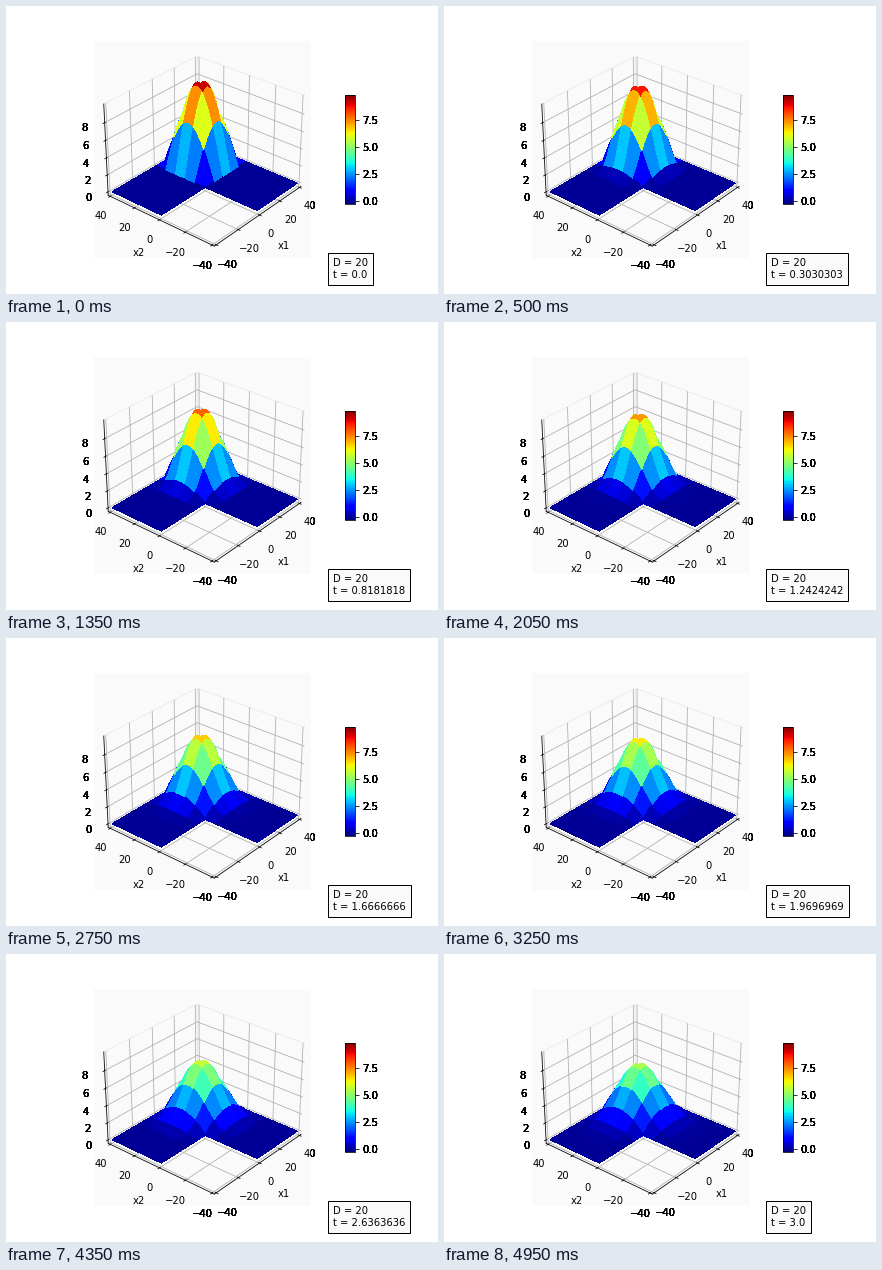
Animation, 432 px wide and 288 px high, one loop 5 s. Source, as a matplotlib script:

```python
import numpy as np
import matplotlib.pyplot as plt
from matplotlib.animation import FuncAnimation
from matplotlib.transforms import Bbox
from mpl_toolkits.mplot3d.art3d import Poly3DCollection

W, H = 432, 288
FRAMES, STEPS = 100, 3
LOW, HIGH = -0.2, 9.85
SIZE, STRIDE = 40, 8
DIFFUSION = 15
LEFT, BOTTOM, SIDE = 87.57, 36, 217.44

plt.rcParams["font.family"] = "DejaVu Sans"
fig = plt.figure(figsize=(W / 72, H / 72), dpi=72, facecolor="white")


def rect(x, y, w, h):
    return [x / W, y / H, w / W, h / H]


line = np.arange(-SIZE, SIZE + 1)
x, y = np.meshgrid(line, line)
inside = (abs(x) < SIZE) & (abs(y) < SIZE) & ~((x <= 0) & (y <= 0))


def solve():
    """Heat flow on the L, starting from one sine bump in a quarter."""
    bump = np.sin(np.pi * x / SIZE) * np.sin(np.pi * y / SIZE)
    u = np.where((x > 0) & (y > 0), HIGH * bump, 0) * inside
    rate = DIFFUSION / 33 / STEPS
    states = [u]
    for _ in range((FRAMES - 1) * STEPS):
        flow = sum(np.roll(u, d, axis) for d in (-1, 1) for axis in (0, 1))
        u = (u + rate * (flow - 4 * u)) * inside
        states.append(u)
    return states[::STEPS]


def cell_rims():
    """Row and column indices around the rim of every cell of the L."""
    run = np.arange(STRIDE)
    zero, full = 0 * run, 0 * run + STRIDE
    rows = np.concatenate([zero, run, full, STRIDE - run])
    cols = np.concatenate([run, full, STRIDE - run, zero])
    corners = [(j, i) for j in range(0, 2 * SIZE, STRIDE)
               for i in range(0, 2 * SIZE, STRIDE)
               if i >= SIZE or j >= SIZE]
    j, i = np.array(corners).T
    return j[:, None] + rows, i[:, None] + cols


states = solve()
rims = cell_rims()


def cells(u):
    return np.stack([x[rims], y[rims], u[rims]], axis=-1)


ax = fig.add_axes(rect(LEFT, BOTTOM, SIDE, SIDE), projection="3d",
                  facecolor="#fafafa")
ax.view_init(30, -140)
surf = Poly3DCollection(cells(states[0]), cmap="jet", linewidths=0,
                        antialiased=False)
surf.set_array(states[0][rims].mean(axis=1))
surf.set_clim(LOW, HIGH)
ax.add_collection3d(surf)

for axis in (ax.xaxis, ax.yaxis, ax.zaxis):
    axis.set_pane_color((0.98, 0.98, 0.98, 1))
    axis.pane.set_edgecolor("#ececec")
ax.set_xticks(range(-40, 41, 20))
ax.set_yticks(range(-40, 41, 20))
ax.set_zticks(range(0, 9, 2))


def padded(low, high):
    margin = (high - low) / 48
    return low - margin, high + margin


ax.set_xlim(padded(-SIZE, SIZE))
ax.set_ylim(padded(-SIZE, SIZE))
ax.set_zlim(padded(LOW, HIGH))
ax.set_xlabel("x1")
ax.set_ylabel("x2")

cax = fig.add_axes(rect(338.58, 90.36, SIDE / 20, SIDE / 2))
fig.colorbar(surf, cax=cax, ticks=[0, 2.5, 5, 7.5])

# Text is heavier wherever it leaves the plot square
strips = [Bbox.from_extents(0, 0, LEFT, H),
          Bbox.from_extents(LEFT + SIDE, 0, W, H),
          Bbox.from_extents(LEFT, 0, LEFT + SIDE, BOTTOM)]


def thicken(text):
    draw = text.draw

    def heavy(renderer):
        draw(renderer)
        text.set_clip_on(True)
        for strip in strips:
            text.set_clip_box(strip)
            for _ in range(8):
                draw(renderer)
        text.set_clip_box(None)

    text.draw = heavy


for axis in (ax.xaxis, ax.yaxis, ax.zaxis, cax.yaxis):
    for label in axis.get_ticklabels():
        thicken(label)

note = fig.text(327 / W, 14 / H, "", fontsize=10, va="bottom",
                bbox=dict(boxstyle="square,pad=0.5", facecolor="#fafafa",
                          edgecolor="black", linewidth=1))


def update(frame):
    u = states[frame]
    surf.set_verts(cells(u))
    surf.set_array(u[rims].mean(axis=1))
    note.set_text(f"D = 20\nt = {str(frame / 33)[:9]}")
    return surf, note


anim = FuncAnimation(fig, update, frames=FRAMES, interval=50, repeat=True)
plt.show()
```
